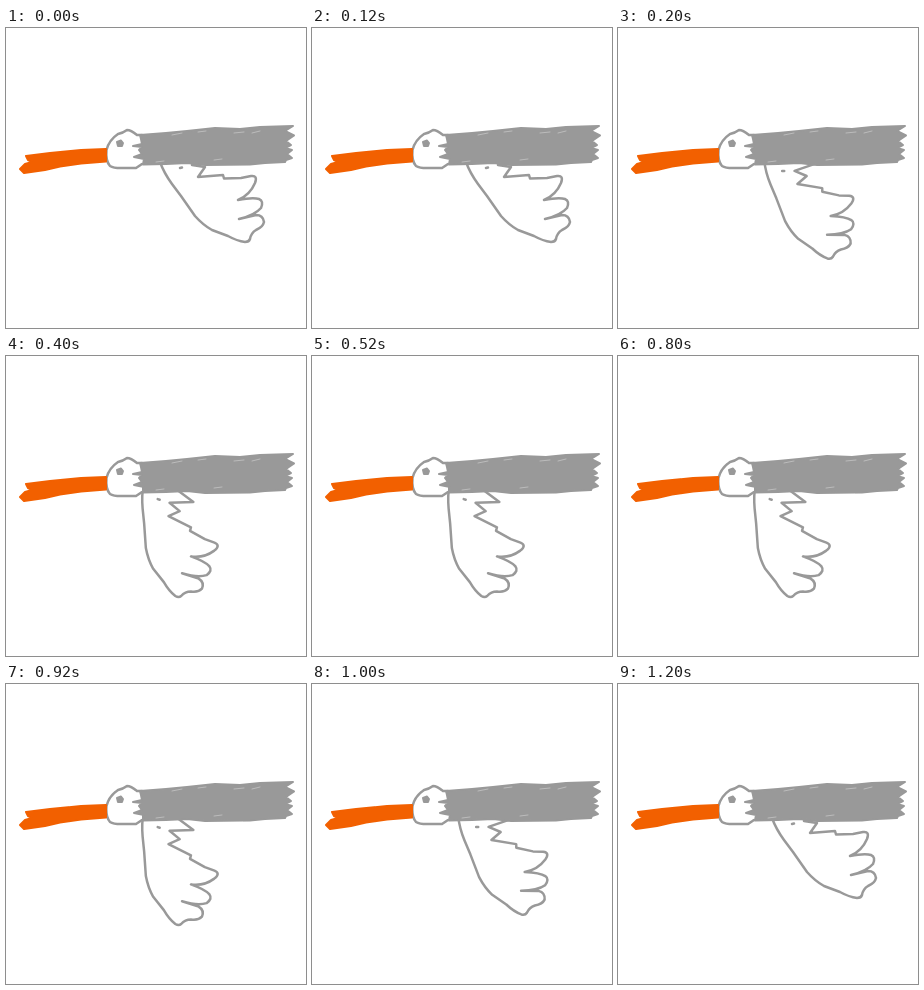
Recreate the animation shown at these times as an HTML page. Size 300x300 px, loop 1.4 s.

```html
<!DOCTYPE html>
<html>
<head>
<meta charset="utf-8">
<title>Flying bird</title>
<style>
  html, body { margin: 0; height: 100%; overflow: hidden; background: #fff; }
  svg { display: block; width: 100%; height: 100%; }
</style>
</head>
<body>
<svg viewBox="0 0 300 300" fill="none" stroke="#999" stroke-width="2.5" stroke-linecap="round" stroke-linejoin="round">
  <g id="wing">
    <path d="M154 134Q158 145 166 156L175 168L189 188Q197 197 206 202L222 208Q231 213 239 214Q243 214 244 211
      Q245 205 250 202Q257 199 258 194Q257 187 250 187L233 191Q249 187 255 180Q258 173 253 171Q247 169 232 172
      Q244 167 249 155Q252 147 245 148L235 150L218 150.500L217 147L192 149L199 139L186 137L206 124L184 122"/>
    <path d="M174 140L176 139.500"/>
  </g>
  <path fill="#fff" d="M136 107L131 107Q125 102 121 102Q117 105 112 106Q103 112 100.500 122Q99.500 133 104 138Q108 140.500 118 140L130 140L136 136"/>
  <path fill="#999" stroke-width="2" d="M111 114L115 112.500L117 115L116 118L112 118Z"/>
  <path fill="#999" stroke-width="2" d="M134 107L160 105L181 103L209 100L234 101L254 99L287 98L279 103L288 107.500
    L280 113L285 117L279 120L286 122L281 126L286 130L280 132L279 134L259 135L244 136.500L199 137L181 135L160 136L137 136.500L138 131L128 129
    L136 126L133 122L136 119L127 118L136 116L135 111Z"/>
  <path stroke="#c4c4c4" stroke-width=".8" d="M166 107L176 105M192 104L200 103M228 105L238 104M150 134L158 133M208 132L216 131M246 105L254 103"/>
  <path fill="#f26000" stroke="#f26000" stroke-width="2" d="M20 128L44 125L75 122L100 121L100 133.500L75 135.500L54 138.500L39 142L18 145L14 141L19 136L26 134L22 132Z"/>
</svg>
<script>
  const wing = document.getElementById('wing');
  const angles = [0, 14, 31, 51.3, 31, 14, 0];
  const start = performance.now();

  function draw(now) {
    const step = Math.floor(Math.max(0, now - start) / 200) % angles.length;
    wing.setAttribute('transform', `rotate(${angles[step]} 157.2 101.4)`);
    requestAnimationFrame(draw);
  }
  draw(start);
</script>
</body>
</html>
```
